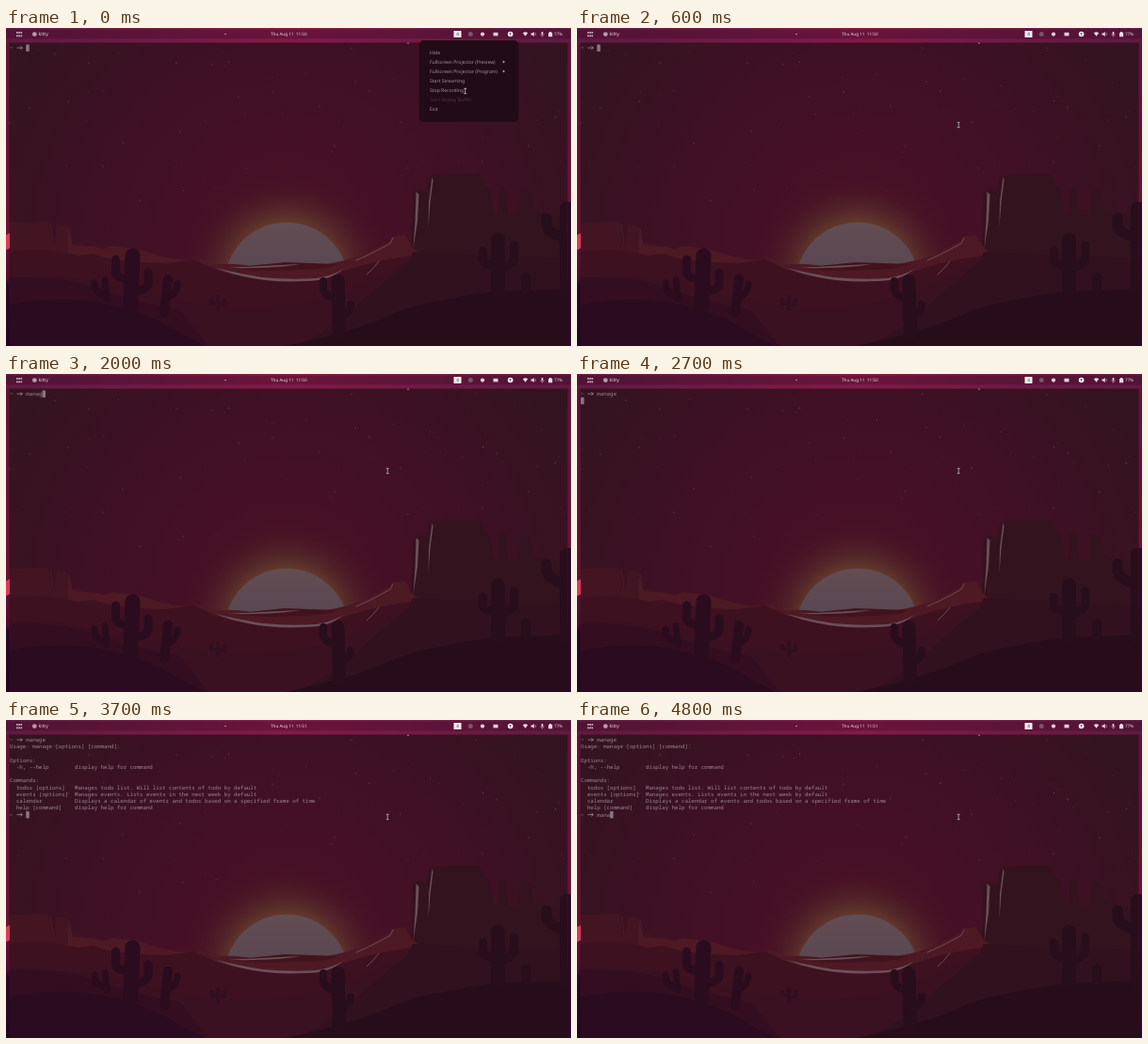
Write an HTML page that moves like this. It is 600 px wide and 338 px high and loops after 5000 ms.

```html
<!DOCTYPE html>
<html lang="en">
<head>
<meta charset="utf-8">
<title>Terminal</title>
<style>
html, body { margin: 0; width: 100%; height: 100%; overflow: hidden; background: #35111f; }
svg { display: block; width: 600px; height: 338px; }
text { text-rendering: geometricPrecision; white-space: pre; }
.bar text { font: 500 4.6px "Noto Sans", sans-serif; fill: #ecd8e2; }
.menu text { font: 5.05px "Noto Sans", sans-serif; fill: #a3919b; }
.menu .off { fill: #4d3440; }
.term text { font: 5.75px "Noto Sans Mono", monospace; fill: #9a8690; }
.arrow { fill: none; stroke: #a08d97; stroke-width: .8; }
.cactus { fill: none; stroke-linecap: round; stroke-linejoin: round; }
.rim { fill: none; stroke: #745861; stroke-linecap: round; }
.light { fill: #6b5058; }
</style>
</head>
<body>
<svg viewBox="0 0 600 338" xmlns="http://www.w3.org/2000/svg">
  <defs>
    <radialGradient id="sky" gradientUnits="userSpaceOnUse" cx="298" cy="235" r="350">
      <stop offset="0" stop-color="#4b1025"/>
      <stop offset=".35" stop-color="#441025"/>
      <stop offset=".65" stop-color="#3d1123"/>
      <stop offset="1" stop-color="#331420"/>
    </radialGradient>
    <radialGradient id="glow" gradientUnits="userSpaceOnUse" cx="298" cy="264" r="116">
      <stop offset=".48" stop-color="#643d2c"/>
      <stop offset=".6" stop-color="#572c2a" stop-opacity=".85"/>
      <stop offset=".78" stop-color="#4b1a27" stop-opacity=".55"/>
      <stop offset="1" stop-color="#471025" stop-opacity="0"/>
    </radialGradient>
    <linearGradient id="sun" x2="0" y2="1">
      <stop offset="0" stop-color="#634d53"/>
      <stop offset=".35" stop-color="#5a4751"/>
    </linearGradient>
    <linearGradient id="bar">
      <stop offset="0" stop-color="#611a40"/>
      <stop offset=".5" stop-color="#861a48"/>
      <stop offset="1" stop-color="#611a40"/>
    </linearGradient>
    <linearGradient id="edge" gradientUnits="userSpaceOnUse" x1="0" x2="0" y1="13" y2="338">
      <stop offset="0" stop-color="#5f1438"/>
      <stop offset=".62" stop-color="#6a1233"/>
      <stop offset=".78" stop-color="#4f0e30"/>
      <stop offset=".8" stop-color="#2b0826"/>
      <stop offset="1" stop-color="#210720"/>
    </linearGradient>
  </defs>

  <rect width="600" height="338" fill="url(#sky)"/>
  <g id="stars" fill="#8a6470"></g>
  <circle cx="298" cy="264" r="116" fill="url(#glow)"/>
  <circle cx="298" cy="273" r="66.2" fill="url(#sun)"/>

  <!-- buttes -->
  <path fill="#431523" d="M0 207L45 206 48 229 52 230 54 209 62 210 66 212 70 232 73 228 82 229 87 238 100 234 112 242 140 250V285H0Z"/>
  <path fill="#33131e" d="M424 262L430 235 432 175 438 171 446 174 449 160 453 156 503 155 508 166 514 172 518 196 522 198 524 171 527 168 531 170 533 197 544 200 547 171 556 173 561 194 571 196 600 202V300H424Z"/>
  <path class="light" d="M435.500 174L438.500 177 437 205 432.500 235 434.500 205ZM452.500 158L453.500 162 450.500 185 448.500 212 449 185Z"/>
  <path class="rim" stroke-width=".5" opacity=".4" d="M47 208L50 229M67 213L70 231"/>

  <!-- dunes -->
  <path fill="#4d1924" d="M66 215L71 231 80 232Q92 231 104 235L112 232Q138 233 156 240Q180 248 197 246L208 245 219 252Q240 249 260 253Q300 248 335 252Q366 247 385 238L408 226 410 222 424 220 431 233 440 240V290H66Z"/>
  <path fill="#3d1120" d="M0 238Q45 233 76 242L92 240 108 245Q140 250 170 250L200 246 219 255Q245 267 300 268Q335 269 360 258Q395 246 430 242L600 250V338H0Z"/>
  <path fill="#42131f" d="M236 255Q268 252 296 249Q325 250 352 251Q340 257 310 257Q272 260 236 255Z"/>
  <path class="light" d="M236 255Q270 253 312 251Q285 256 236 255ZM222 255Q248 261 272 265Q302 268 330 266Q348 263 358 256Q344 269 318 269Q266 272 222 255Z"/>
  <path class="rim" stroke-width=".8" d="M383 262Q390 256 396 248M372 247Q386 241 397 235L408 229 411 223"/>
  <path fill="#3a1120" d="M0 265Q60 260 105 273Q170 288 225 298Q295 300 345 286Q400 263 429 247V338H0Z"/>
  <path fill="#31111d" d="M432 238L600 245V338H310Q362 310 380 288Q404 268 427 249Z"/>
  <path fill="#330e20" d="M0 266Q55 262 95 276Q135 291 185 300L215 338H0Z"/>
  <g stroke="#300f20" class="cactus">
    <path stroke-width="4" d="M225 286V299M218 289V293H225M232 289V294H225"/>
  </g>
  <path fill="#2a0b1f" d="M0 295Q55 283 105 293Q150 303 174 318Q194 330 211 338H0Z"/>
  <path fill="#270d1a" d="M296 338Q360 325 402 308Q430 294 466 289Q506 279 552 279L600 277V338Z"/>

  <g class="cactus" stroke="#2b0c1f">
    <path stroke-width="16" d="M134.500 242L132 297"/>
    <path stroke-width="9" d="M116.500 246V260Q118 266 130 267M151 260V272Q149 279 136 280"/>
    <path stroke-width="7" d="M105 268L107 288M94 271Q94 283 106 284"/>
    <path stroke-width="10" d="M172 267L168 303"/>
    <path stroke-width="7" d="M182 272Q181 284 170 287"/>
  </g>
  <g class="cactus" stroke="#280d1b">
    <path stroke-width="14" d="M352.500 269L354 326"/>
    <path stroke-width="8" d="M337 269V278Q340 287 352 287M366 294Q366 303 354 306"/>
    <path stroke-width="15" d="M522.500 225V279"/>
    <path stroke-width="9" d="M506.500 237V247Q508 252 522 253M539.500 231V246Q537 253 523 256"/>
    <path stroke-width="10" d="M552 265V279"/>
    <path stroke-width="14" d="M595 192V281"/>
    <path stroke-width="11" d="M574 202V210Q577 219 594 223"/>
  </g>

  <!-- desktop around the window -->
  <path fill="url(#edge)" d="M0 13H3.500V338H0ZM596.500 13H600V338H596.500Z"/>
  <path fill="#2a0a26" d="M596.500 185H600V338H596.500Z"/>
  <path fill="#d83a58" d="M0 220L4 218V234L0 236Z"/>
  <rect width="600" height="15.500" fill="url(#bar)"/>
  <rect y="1.500" width="600" height="10" fill="#28081e" opacity=".3"/>
  <circle cx="233" cy="6.500" r=".7" fill="#e8bccb"/>
  <circle cx="427" cy="16.300" r=".7" fill="#d5a3b1"/>

  <g class="bar">
    <path fill="#c9adb9" d="M11 4h1.700v1.700h-1.700zM13.200 4h1.700v1.700h-1.700zM15.400 4h1.700v1.700h-1.700zM11 7.600h1.700v1.700h-1.700zM13.200 7.600h1.700v1.700h-1.700zM15.400 7.600h1.700v1.700h-1.700z"/>
    <circle cx="30.300" cy="6.600" r="2.400" fill="#b99aaa"/>
    <text x="34.600" y="8.300" style="font-size:5px">kitty</text>
    <text id="clock" x="281" y="8.200">Thu Aug 11  11:50</text>
    <rect x="475.500" y="3" width="8" height="7" rx=".6" fill="#f5edf1"/>
    <text x="478.200" y="8.200" style="fill:#4a1530">4</text>
    <circle cx="493.300" cy="6.500" r="2.500" fill="#7d536a"/>
    <circle cx="506" cy="6.600" r="2.100" fill="#e4d0da"/>
    <rect x="517.500" y="4.800" width="5" height="3.600" fill="#e4d0da"/>
    <circle cx="535.600" cy="6.500" r="2.800" fill="#fff"/>
    <path stroke="#601337" stroke-width=".6" d="M534.200 5.800H537M535.600 5V8.300"/>
    <path fill="#ecd8e2" d="M548.800 5.200Q551.500 3.400 554.200 5.200L551.500 8.800ZM557.500 5.600H559L560.800 4V9L559 7.400H557.500ZM568.700 4H570.300V7.300H568.700ZM576 5H577V4H579.200V5H580.200V9.300H576Z"/>
    <path fill="none" stroke="#ecd8e2" stroke-width=".5" d="M562 5Q563 6.500 562 8M567.800 6.500Q568 8.300 569.500 8.300T571.200 6.500M569.500 8.300V9.500"/>
    <text x="582" y="8.200">77%</text>
  </g>

  <g class="term">
    <text id="first" x="4" y="23.100"></text>
    <path class="arrow" d="M11.500 21.100H17.300M15.300 19.300L17.300 21.100 15.300 22.900"/>
    <g id="output">
      <path class="arrow" d="M11.500 100.600H17.300M15.300 98.800L17.300 100.600 15.300 102.400"/>
    </g>
    <rect id="caret" width="3.500" height="7.300" fill="#8b7580"/>
  </g>

  <g id="menu" class="menu">
    <rect x="438.500" y="13" width="106" height="87" rx="5" fill="#2a0c1a"/>
    <rect x="439.500" y="14" width="104" height="85" rx="4" fill="#210b17"/>
    <path fill="#b5a4ad" d="M527.700 34.600L530 36.100 527.700 37.600ZM527.700 44.600L530 46.100 527.700 47.600Z"/>
  </g>

  <g id="mouse">
    <path fill="none" stroke="#2a0d19" stroke-width="1.700" d="M-1.500 -2.700H1.500M0 -2.700V2.700M-1.500 2.700H1.500"/>
    <path fill="none" stroke="#cdbfc5" stroke-width=".8" d="M-1.500 -2.700H1.500M0 -2.700V2.700M-1.500 2.700H1.500"/>
  </g>
</svg>
<script>
const LOOP = 5000, COL = 3.45, ROW = 7.227, LEFT = 4;
const $ = id => document.getElementById(id);

function add(parent, tag, attrs, content = "") {
  const el = document.createElementNS("http://www.w3.org/2000/svg", tag);
  for (const key in attrs) el.setAttribute(key, attrs[key]);
  el.textContent = content;
  return parent.appendChild(el);
}

const star = (cx, cy, r, opacity) => add($("stars"), "circle", { cx, cy, r, opacity });

// A few bright stars, then faint scattered ones.
[[52, 28], [66, 78], [88, 37], [181, 37], [124, 122], [185, 110], [142, 183], [247, 73],
 [283, 68], [333, 83], [371, 57], [386, 67], [419, 100], [506, 142], [349, 125], [25, 85],
 [4, 101], [555, 125], [521, 84]].forEach(([x, y]) => star(x, y, .6, .8));

let seed = 11;
const random = () => (seed = seed * 16807 % 2147483647) / 2147483647;
for (let i = 0; i < 60; i++) {
  star(5 + random() * 588, 20 + 170 * random() ** 1.3, .35 + random() * .25, .35 + random() * .4);
}

["Hide", "Fullscreen Projector (Preview)", "Fullscreen Projector (Program)",
 "Start Streaming", "Stop Recording", "Start Replay Buffer", "Exit"].forEach((label, i) =>
  add($("menu"), "text", { x: 450, y: 27.9 + i * 10, class: i === 5 ? "off" : "" }, label));

["Usage: manage [options] [command].",
 "",
 "Options:",
 "  -h, --help        display help for command",
 "",
 "Commands:",
 "  todos [options]   Manages todo list. Will list contents of todo by default",
 "  events [options]  Manages events. Lists events in the next week by default",
 "  calendar          Displays a calendar of events and todos based on a specified frame of time",
 "  help [command]    display help for command"].forEach((line, i) =>
  add($("output"), "text", { x: LEFT, y: 23.1 + (i + 1) * ROW }, line));
const second = add($("output"), "text", { x: LEFT, y: 23.1 + 11 * ROW });

const firstKeys = [1100, 1300, 1400, 1500, 2000, 2200];
const secondKeys = [4300, 4400, 4600, 4800];
const ENTER = 2500, OUTPUT = 2900, TICK = 3200;

const prompt = typed => "~    " + typed;
const typedBy = (keys, t) => "manage".slice(0, keys.filter(k => t >= k).length);
const show = (el, on) => el.setAttribute("visibility", on ? "visible" : "hidden");

function placeCaret(row, col) {
  $("caret").setAttribute("x", LEFT + col * COL);
  $("caret").setAttribute("y", 17.6 + row * ROW);
}

function draw(now) {
  const t = Math.floor(now % LOOP / 100) * 100;
  const top = typedBy(firstKeys, t), bottom = typedBy(secondKeys, t);
  $("first").textContent = prompt(top);
  second.textContent = prompt(bottom);
  show($("output"), t >= OUTPUT);
  show($("menu"), t < 100);
  $("clock").textContent = "Thu Aug 11  11:" + (t < TICK ? 50 : 51);

  if (t < ENTER) placeCaret(0, 5 + top.length);
  else if (t < OUTPUT) placeCaret(1, 0);
  else placeCaret(11, 5 + bottom.length);
  const blinkOff = (t >= 3200 && t < 3700) || (t >= 4200 && t < 4300);
  show($("caret"), !blinkOff);

  const p = Math.min(1, Math.max(0, (t - 100) / 500));
  const e = p * p * (3 - 2 * p);
  $("mouse").setAttribute("transform", `translate(${487.7 - 82.5 * e} ${67 + 36 * e})`);
}

function frame() {
  draw(performance.now());
  requestAnimationFrame(frame);
}
frame();
</script>
</body>
</html>
```
